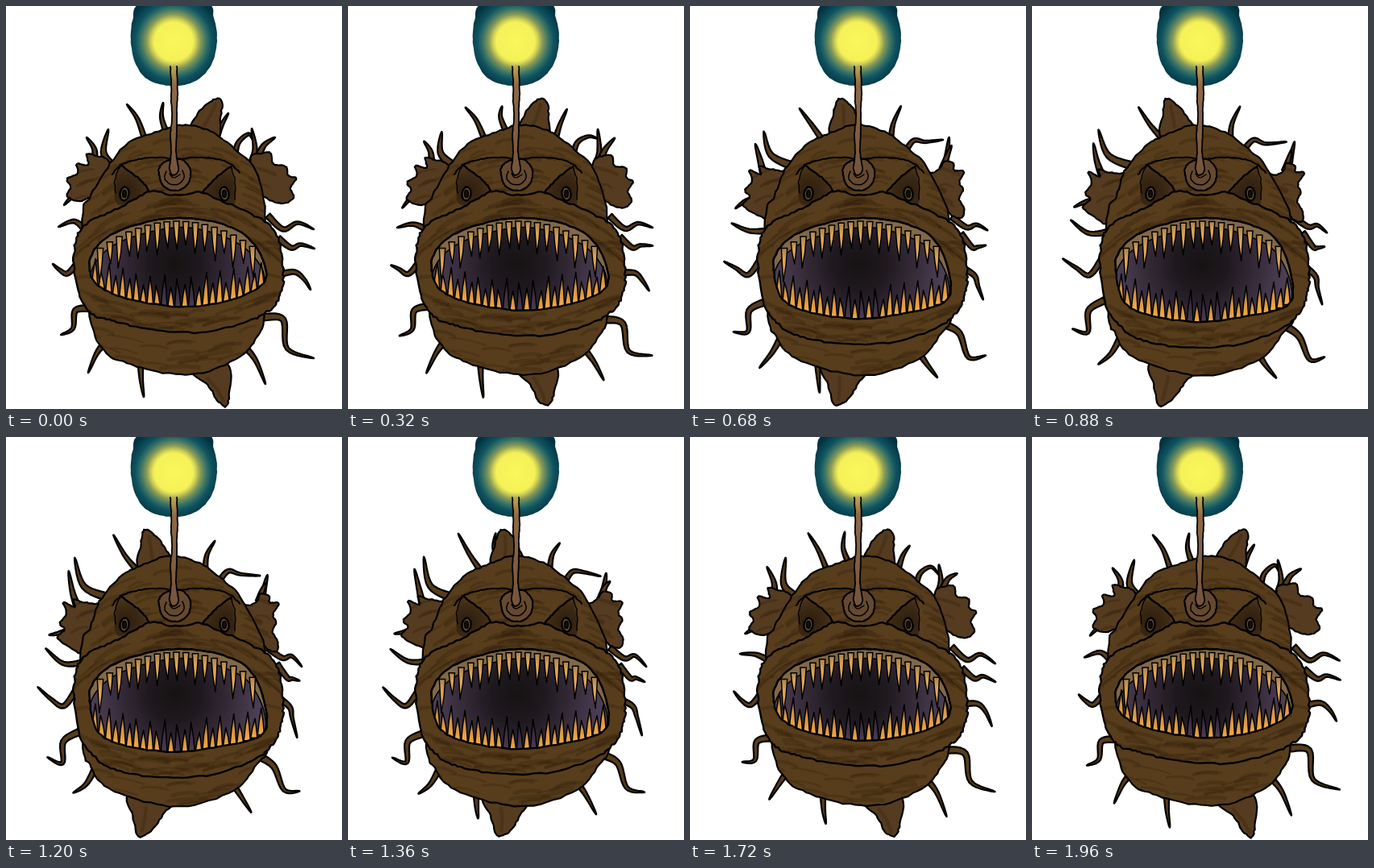
These frames come from a looping animation (417x500 px, 2 s). An HTML page with a canvas:

```html
<!DOCTYPE html>
<html lang="en">
<head>
<meta charset="utf-8">
<title>Anglerfish</title>
<style>
html, body { margin: 0; width: 100%; height: 100%; overflow: hidden; background: #fff; }
canvas { display: block; }
</style>
</head>
<body>
<canvas id="stage" width="417" height="500"></canvas>
<script>
const g = document.getElementById("stage").getContext("2d");
const LOOP = 2000, STEP = 40;
const SKIN = "#573d1c", FIN = "#553b1f", STREAK = "rgba(45,28,8,.27)";
let turn = 0, sway = 0; // turn: 0 = right, 1 = left

const rand = i => { const v = Math.sin(i * 127.1 + 3.7) * 43758.5453; return v - Math.floor(v); };

function points(text) {
  const n = text.split(/[ ,]+/).map(Number), list = [];
  for (let i = 0; i < n.length; i += 2) list.push([n[i], n[i + 1]]);
  return list;
}

// Blend of the two extreme poses.
function pose(a, b = a) {
  const q = points(b);
  return points(a).map(([x, y], i) => [x + (q[i][0] - x) * turn, y + (q[i][1] - y) * turn]);
}

// Catmull-Rom samples through the points, with a steady hand-drawn wobble.
function smooth(p, closed, rough = 0) {
  const n = p.length, out = [], steps = 7;
  const at = i => closed ? p[(i + n) % n] : p[Math.max(0, Math.min(n - 1, i))];
  const last = closed ? n : n - 1;
  for (let i = 0; i < last; i++) {
    const a = at(i - 1), b = at(i), c = at(i + 1), d = at(i + 2);
    for (let s = 0; s < steps; s++) {
      const t = s / steps, k = out.length;
      out.push([0, 1].map(j => b[j] + .5 * t * (c[j] - a[j] +
        t * (2 * a[j] - 5 * b[j] + 4 * c[j] - d[j] + t * (3 * (b[j] - c[j]) + d[j] - a[j]))) +
        (rand(k * 2 + j) - .5) * 2 * rough));
    }
  }
  if (!closed) out.push(p[n - 1]);
  return out;
}

function trace(list, closed) {
  g.beginPath();
  list.forEach(([x, y]) => g.lineTo(x, y));
  if (closed) g.closePath();
}

function ink(fill, width = 2.2) {
  if (fill) { g.fillStyle = fill; g.fill(); }
  if (width) { g.strokeStyle = "#000"; g.lineWidth = width; g.stroke(); }
}

function blob(list, fill, rough = .7, width = 2.2) {
  trace(smooth(list, true, rough), true);
  ink(fill, width);
}

function line(text, width = 2, rough = .5) {
  trace(smooth(points(text), false, rough));
  ink(null, width);
}

function clipped(list, draw) {
  g.save();
  trace(smooth(list, true), true);
  g.clip();
  draw();
  g.restore();
}

function radial(x, y, r, ...stops) {
  const grad = g.createRadialGradient(x, y, 0, x, y, r);
  stops.forEach(([at, color]) => grad.addColorStop(at, color));
  return grad;
}

function tentacle(a, b, half = 3.4) {
  const p = pose(a, b), tip = p[p.length - 1];
  tip[1] += sway * (tip[0] < 210 ? 4 : -4);
  const c = smooth(p, false), left = [], right = [];
  c.forEach(([x, y], i) => {
    const u = c[Math.max(0, i - 1)], v = c[Math.min(c.length - 1, i + 1)];
    const dx = v[0] - u[0], dy = v[1] - u[1], len = Math.hypot(dx, dy) || 1;
    const w = half * (1 - i / (c.length - 1)) ** .7 + .2;
    left.push([x - dy / len * w, y + dx / len * w]);
    right.unshift([x + dy / len * w, y - dx / len * w]);
  });
  trace(left.concat(right), true);
  ink(SKIN, 2.2);
}

// Short shading strokes along a bowed band.
function streaks(seed, count, top, height, bow) {
  g.strokeStyle = STREAK;
  for (let i = 0; i < count; i++) {
    const x = 90 + 250 * rand(seed + i), off = rand(seed + i + 100) * height;
    const len = 8 + 18 * rand(seed + i + 200);
    const y = v => top + off + bow * ((v - 213) / 120) ** 2;
    g.lineWidth = 2 + 3 * rand(seed + i + 300);
    g.beginPath();
    g.moveTo(x - len, y(x - len) + 2);
    g.quadraticCurveTo(x, y(x) - 3, x + len, y(x + len) + 1);
    g.stroke();
  }
}

function tooth(x, base, tip, half, fill, lean) {
  g.beginPath();
  g.moveTo(x - half, base);
  g.quadraticCurveTo(x - half * .7, (base + tip) / 2, x + lean, tip);
  g.quadraticCurveTo(x + half * .8, (base + tip) / 2, x + half, base);
  g.closePath();
  ink(fill, 1.5);
}

function drawTentacles() {
  // top
  tentacle("173 168 163 140 150 122", "160 163 146 147 132 124", 3);
  tentacle("198 155 193 137 195 120", "187 152 177 138 179 124", 3);
  tentacle("261 165 268 147 276 133", "246 166 248 146 258 126", 3);
  tentacle("284 188 288 170 301 159 307 167", "263 178 275 166 290 171 316 170", 3);
  // side fins
  tentacle("304 197 309 178 305 152", "318 207 321 190 326 170", 4);
  tentacle("312 190 320 173 334 163", "314 205 318 192 322 180", 4);
  tentacle("108 200 110 179 100 163", "87 212 80 192 76 169", 4);
  tentacle("131 198 121 181 127 153", "130 200 95 186 82 152", 5);
  // left
  tentacle("92 234 82 237 72 247", "77 240 64 244 52 248", 3);
  tentacle("97 276 84 267 65 274", "96 280 70 282 48 264");
  tentacle("88 320 76 332 66 327 58 320", "86 315 71 334 55 325 38 312");
  tentacle("104 375 86 378 83 400 68 408", "90 365 70 378 69 405 50 399", 4);
  tentacle("120 421 112 432 102 455", "110 410 98 431 82 443");
  tentacle("167 447 168 465 171 485", "156 445 157 460 158 474", 3);
  // right
  tentacle("325 260 344 277 362 269 382 277", "325 262 343 274 354 272 366 283");
  tentacle("338 288 354 300 366 296 383 301", "336 281 349 299 354 300 363 300");
  tentacle("340 333 358 330 370 339 378 352", "340 324 352 336 354 350 360 372");
  tentacle("320 386 344 389 349 425 382 437", "316 398 332 411 345 439 363 437", 4.2);
  tentacle("296 422 310 440 322 469", "281 432 290 446 303 463");
}

function drawFins() {
  blob(pose("230 158 238 133 258 116 268 119 266 140 262 168",
            "160 165 162 132 165 115 180 124 194 141 200 155"), FIN);
  blob(pose("228 450 250 470 262 489 273 497 277 480 275 445",
            "147 442 150 470 157 496 175 486 190 465 202 450"), FIN);
  g.strokeStyle = STREAK;
  g.lineWidth = 4;
  [["245 150 254 135 260 122", "176 150 174 138 171 124"],
   ["250 462 262 476 270 490", "168 460 165 474 161 488"]].forEach(([a, b]) => {
    trace(smooth(pose(a, b), false));
    g.stroke();
  });
  const left = pose("132 205 125 190 112 186 100 184 102 197 88 196 89 208 76 214 80 225 76 236 92 242 115 230",
                    "122 212 105 208 92 206 82 203 84 212 70 206 74 220 66 232 72 240 63 250 78 262 97 268");
  const right = pose("292 205 302 196 305 185 318 183 328 182 332 196 347 199 350 210 360 214 353 226 357 238 342 245 320 236",
                     "288 205 300 210 312 205 315 196 326 198 327 206 338 207 330 220 333 232 329 243 336 256 334 268 318 258");
  [left, right].forEach(fin => {
    blob(fin, FIN, .5);
    clipped(fin, () => streaks(40, 36, 185, 50, 18));
  });
}

function drawBody() {
  const body = pose(
    "95 265 105 235 130 195 152 170 190 155 215 148 245 152 275 170 310 205 322 260 322 375 312 410 290 435 245 455 195 455 150 443 122 428 104 385",
    "93 265 105 235 115 205 140 175 165 160 200 148 235 155 265 175 290 200 322 265 328 375 312 405 283 438 225 458 170 452 120 432 103 405 95 385");
  blob(body, SKIN, .9);
  clipped(body, () => {
    streaks(500, 24, 158, 32, 50);
    streaks(700, 26, 192, 36, 45);
    streaks(900, 24, 412 + 14 * turn, 38, -26);
  });
}

function drawBrow() {
  const socket = (text, x) => {
    g.fillStyle = radial(x, 230, 38, [0, "#2c1d0c"], [.5, "#3c2914"], [1, SKIN]);
    trace(smooth(points(text), true), true);
    g.fill();
  };
  socket("143 199 160 211 173 223 178 235 140 247 135 224", 148);
  socket("279 201 262 213 250 224 243 233 268 246 284 246", 271);
  line("132 209 143 197 165 190 190 188 210 190 235 188 262 190 280 197 290 207");
  line("142 197 157 208 170 219 179 233", 2.4);
  line("280 199 264 210 252 222 243 232", 2.4);
  line("142 198 135 216 136 232", 1.4);
  line("279 199 284 216 284 240", 1.4);
  for (const x of [147, 271]) {
    g.beginPath();
    g.ellipse(x, 233, 5.5, 8.5, x < 200 ? .15 : -.15, 0, 7);
    ink("#5c4b30", 2.4);
    g.beginPath();
    g.ellipse(x, 233, 2.4, 4.5, 0, 0, 7);
    ink("#17100a", 1.4);
  }
}

function drawMuzzle() {
  const top = "85 330 85 300 90 282 103 268 130 255 160 240 180 230 210 235 243 231 270 243 305 258 330 275 341 300 344 330 ";
  const face = pose(
    top + "343 350 335 370 322 381 300 391 250 404 195 404 150 395 125 388 106 382 92 360",
    top + "343 350 338 370 328 386 310 400 265 418 215 425 165 421 130 412 108 396 92 372");
  blob(face, SKIN, 1.1, 2.4);
  clipped(face, () => {
    streaks(1100, 46, 238, 26, 50);
    streaks(1400, 36, 378 + 19 * turn, 24, -24);
    streaks(1700, 12, 285, 70, 10);
  });
}

function drawMouth() {
  const lowerA = " 312 350 270 367 215 373 150 363 115 347";
  const lowerB = " 316 372 265 385 210 392 150 385 115 368";
  const rim = "104 328 108 305 130 284 175 268 222 263 270 271 305 292 ";
  const mouth = pose(rim + "323 330" + lowerA, rim + "323 342" + lowerB);
  const inner = "104 336 118 309 150 289 200 276 235 276 275 288 303 306 ";
  blob(mouth, "#806849", .5, 2.4);
  clipped(mouth, () => {
    const dark = radial(210, 320, 112, [0, "#151212"], [.3, "#1f191f"], [.65, "#382d3c"], [1, "#50435a"]);
    blob(pose(inner + "320 332" + lowerA, inner + "321 344" + lowerB), dark, 0, 1.5);

    const shift = 19 * turn;
    for (let i = 0; i < 25; i++) {
      const x = 110 + i * 8.6, d = (x - 213) / 105;
      const base = 375 + shift - 25 * d * d;
      const high = (i % 2 ? 24 : 36) + 7 * rand(i + 60) - 4 * d * d;
      const shaded = i > 8 && i < 16 && i % 2 === 0;
      const fill = g.createLinearGradient(0, base, 0, base - high);
      fill.addColorStop(0, shaded ? "#4b3c52" : "#f6aa45");
      fill.addColorStop(.55, shaded ? "#3a2e40" : "#d0913f");
      fill.addColorStop(1, shaded ? "#241c26" : "#725238");
      tooth(x, base + 1, base - high, 4, fill, 3 * rand(i + 90) - 1.5);
    }
    for (let i = 0; i < 17; i++) {
      const x = 117 + i * 11.8, d = (x - 213) / 105;
      const base = 267 + 40 * d * d;
      const high = (i % 2 ? 27 : 35) + 7 * rand(i + 20);
      const fill = g.createLinearGradient(0, base, 0, base + high);
      fill.addColorStop(0, "#a98250");
      fill.addColorStop(.35, "#dca453");
      fill.addColorStop(1, "#f5b45b");
      tooth(x, base, base + high, 3.7, fill, 3 * rand(i + 45) - 1.5);
    }
  });
  trace(smooth(mouth, true, .5), true);
  ink(null, 2.2);
}

function drawLure() {
  const glow = radial(208, 44, 60, [0, "#f9f75c"], [.4, "#f5f158"], [.46, "#d5d455"],
    [.56, "#879957"], [.68, "#397366"], [.79, "#0f5360"], [1, "#02313f"]);
  blob(points("170 -4 157 18 155 45 160 70 173 89 195 98 222 98 245 86 258 65 262 40 258 15 247 -4"), glow, .3, 0);

  blob(points("190 209 191 199 200 192 216 190 227 199 229 212 223 224 210 229 196 224"), "#65492f", .4, 2.2);
  const stem = g.createLinearGradient(0, 72, 0, 215);
  stem.addColorStop(0, "#c5ad50");
  stem.addColorStop(.18, "#8c6948");
  stem.addColorStop(1, "#735339");
  trace(smooth(points("204 75 205 95 205 118 206 138 204 160 205 182 203 202 207 210 214 203 211 180 212 155 212 130 213 105 212 75"), false, .3));
  ink(stem, 1.8);
  line("199 205 197 214 204 221 214 221 221 213 219 204", 1.5, .2);
  line("203 208 208 213 216 209", 1.4, .2);
}

function draw(now) {
  const t = Math.floor((now % LOOP) / STEP) * STEP;
  const angle = t / LOOP * 2 * Math.PI;
  turn = (1 - Math.cos(angle)) / 1.95;
  sway = Math.sin(angle);
  g.clearRect(0, 0, 417, 500);
  g.lineJoin = g.lineCap = "round";
  drawTentacles();
  drawFins();
  drawBody();
  drawBrow();
  drawMuzzle();
  drawMouth();
  drawLure();
}

const start = performance.now();
function tick() {
  draw(performance.now() - start);
  requestAnimationFrame(tick);
}
tick();
</script>
</body>
</html>
```
